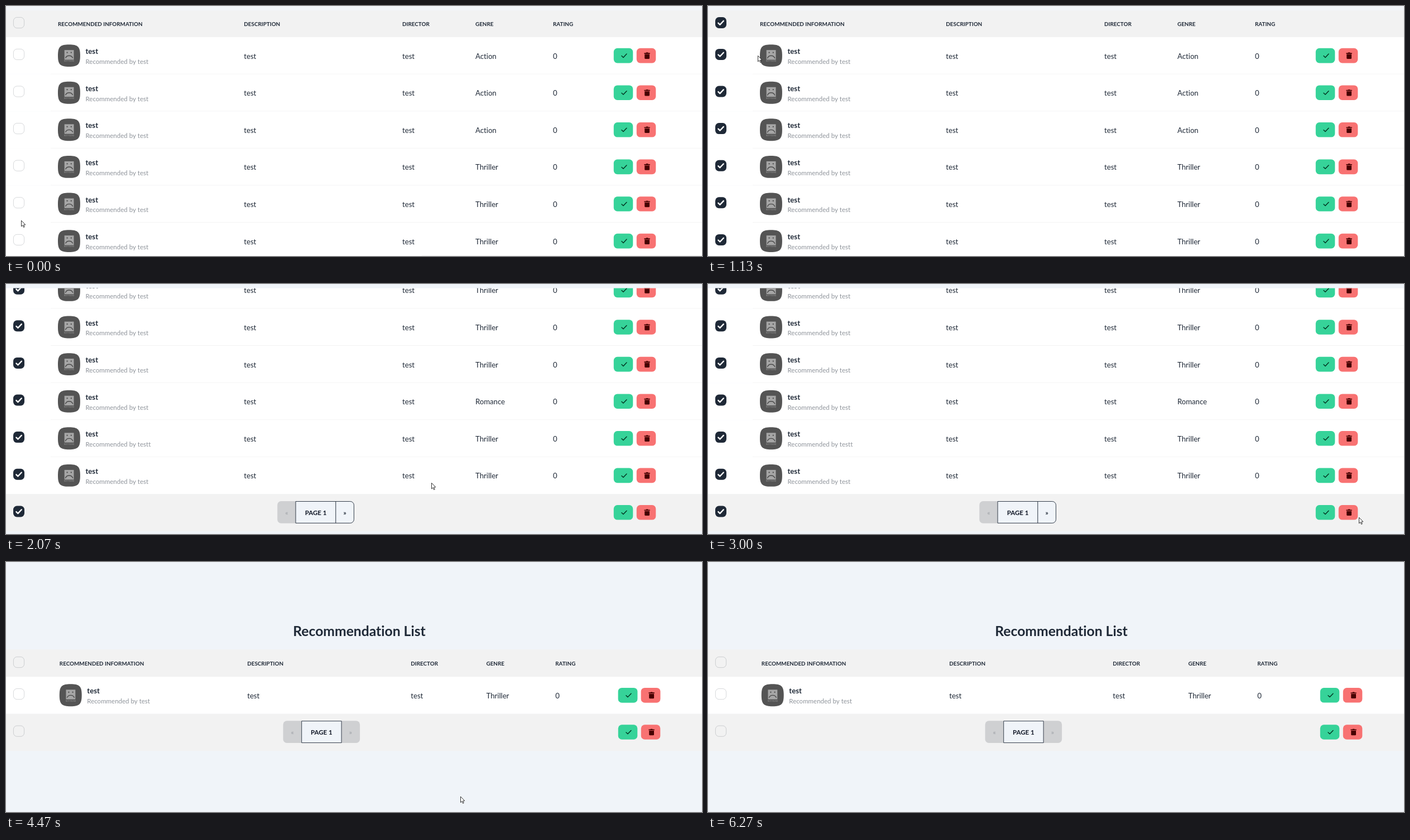
These frames come from a looping animation (1247x449 px, 6.54 s). An HTML page with a canvas:

```html
<!DOCTYPE html>
<html lang="en">
<head>
<meta charset="utf-8">
<title>Recommendation List</title>
<style>
  html, body { margin: 0; width: 100%; height: 100%; overflow: hidden; background: #f0f4f9; }
  canvas { display: block; width: 1247px; height: 449px; }
</style>
</head>
<body>
<canvas id="stage"></canvas>
<script>
const W = 1247, H = 449, LOOP = 6540, FPS = 15;
const INK = '#1f2937', SOFT = '#f2f2f2', PAGE = '#f0f4f9';
const ROW = 66.6, BTN_R = 6.65;

// Type sizes follow one zoom factor
const ZOOM = 0.822;
const SIZE = { head: 12 * ZOOM, small: 14 * ZOOM, body: 16 * ZOOM, title: 30 * ZOOM };

// Moments of the story, in ticks of 1/15 s
const CHECK = 12, SCROLL = 22, BLINK = 52, RELOAD = 65, LEAVE = 86, RETURN = 90, EXIT = 94;
const SCROLL_END = 344.6, SCROLL_TICKS = 5;

const canvas = document.getElementById('stage');
const dpr = window.devicePixelRatio || 1;
canvas.width = W * dpr;
canvas.height = H * dpr;
const ctx = canvas.getContext('2d');

// Column positions of the long table and of the single-row table
const wide = { info: 93, desc: 426.3, director: 710, genre: 841, rating: 980, accept: 1088.8, pager: 486.2 };
const short = { info: 95.8, desc: 432.2, director: 725.3, genre: 860.5, rating: 984.2, accept: 1096.8, pager: 496.5 };

// Pointer glides: from tick, to tick, destination
const START = [27, 385];
const glides = [
  [1, 10, 17, 34], [14, 17, 89, 89], [17, 21, 703, 261], [24, 32, 763, 359],
  [33, 40, 1177, 432], [41, 45, 1166, 419], [58, 65, 1156, 447], [65, 75, 206, 375],
  [75, 79, 334, 407], [79, 85, 665, 418], [88, 90, 148, 436], [90, 93, 80, 440]
];

const progress = (now, from, to) => Math.min(1, Math.max(0, (now - from) / (to - from)));
const easeOut = (p, power = 2) => 1 - (1 - p) ** power;
const scrollAt = now => SCROLL_END * easeOut(progress(now, SCROLL, SCROLL + SCROLL_TICKS), 2.9);
const genreOf = i => i < 3 ? 'Action' : i === 7 ? 'Romance' : 'Thriller';

// Freshly mounted buttons spring to full size
function popAt(now) {
  const n = now - RELOAD;
  return n < 0 ? 1 : 1 - 0.03 * Math.cos(n * Math.PI / 2.5) * Math.exp(-n / 2);
}

function pointerAt(now) {
  let [x, y] = START;
  for (const [from, to, nextX, nextY] of glides) {
    const p = easeOut(progress(now, from, to));
    x += (nextX - x) * p;
    y += (nextY - y) * p;
  }
  return [Math.round(x), Math.round(y)];
}

function rect(x, y, w, h, color) {
  ctx.fillStyle = color;
  ctx.fillRect(x, y, w, h);
}

function round(x, y, w, h, r, fill, stroke) {
  ctx.beginPath();
  ctx.roundRect(x, y, w, h, r);
  if (fill) { ctx.fillStyle = fill; ctx.fill(); }
  if (stroke) { ctx.strokeStyle = stroke; ctx.lineWidth = 0.9; ctx.stroke(); }
}

function line(points, color, width) {
  ctx.beginPath();
  points.forEach(([x, y]) => ctx.lineTo(x, y));
  ctx.strokeStyle = color;
  ctx.lineWidth = width;
  ctx.lineCap = ctx.lineJoin = 'round';
  ctx.stroke();
}

// Text placed by the vertical middle of its line box
function text(str, x, mid, size, color = INK, weight = 400, align = 'left') {
  ctx.font = `${weight} ${size}px Lato, sans-serif`;
  ctx.letterSpacing = '0.005px'; // any spacing turns ligatures off
  ctx.textAlign = align;
  ctx.fillStyle = color;
  ctx.fillText(str, x, mid + size * 0.387);
}

function checkbox(mid, checked) {
  const y = mid - 10;
  if (!checked) {
    round(13.4, y + 0.4, 19.2, 19.2, 6.3, null, 'rgba(31,41,55,0.2)');
    return;
  }
  round(13, y, 20, 20, BTN_R, INK);
  line([[18.4, mid + 0.6], [21.4, mid + 3.6], [27.8, mid - 3.2]], '#fff', 2.4);
}

function avatar(x, mid) {
  ctx.save();
  ctx.translate(x, mid - 19.95);
  ctx.save();
  ctx.scale(0.1995, 0.1995);
  ctx.fillStyle = '#545454';
  ctx.fill(new Path2D('M100 0C20 0 0 20 0 100s20 100 100 100 100-20 100-100S180 0 100 0Z'));
  ctx.restore();
  rect(11.7, 10, 16.8, 17.3, '#a6a6a6');
  for (const eye of [15.6, 22.8]) rect(eye, 13.4, 2, 2, '#4a4a4a');
  ctx.beginPath();
  ctx.moveTo(13.6, 24.4);
  ctx.bezierCurveTo(15.5, 18.6, 24.7, 18.6, 26.6, 24.4);
  ctx.strokeStyle = '#4a4a4a';
  ctx.lineWidth = 1.4;
  ctx.stroke();
  text('NOT FOUND', 20.1, 30, 3, '#8c8c8c', 700, 'center');
  ctx.restore();
}

function button(x, mid, color, scale, icon) {
  ctx.save();
  ctx.translate(x + 17.2, mid);
  ctx.scale(scale, scale);
  round(-17.2, -13.3, 34.5, 26.6, BTN_R, color);
  ctx.translate(1.6, 0);
  icon();
  ctx.restore();
}

function tickIcon() {
  line([[-4.6, 0.5], [-1.6, 3.3], [4.4, -3]], '#00331f', 1.4);
}

function trashIcon() {
  const c = '#470000';
  round(-5.2, -4.9, 10.4, 1.7, 0.5, c);
  round(-1.9, -5.8, 3.8, 1.5, 0.6, c);
  round(-4.4, -2.5, 8.8, 8.3, [0, 0, 1.5, 1.5], c);
}

function actions(col, mid, scale = 1) {
  button(col.accept, mid, '#36d399', scale, tickIcon);
  button(col.accept + 41, mid, '#f87272', scale, trashIcon);
}

function header(col, top, height, checked) {
  const mid = top + height / 2;
  rect(0, top, W, height, SOFT);
  checkbox(mid - 1.8, checked);
  const labels = { info: 'RECOMMENDED INFORMATION', desc: 'DESCRIPTION', director: 'DIRECTOR', genre: 'GENRE', rating: 'RATING' };
  for (const key in labels) text(labels[key], col[key], mid, SIZE.head, INK, 700);
}

function row(col, top, { genre, by = 'test', checked, loading, scale, border }) {
  const mid = top + ROW / 2;
  rect(0, top, W, ROW, '#fff');
  checkbox(mid - 2.4, checked);
  if (loading) {
    ctx.save();
    ctx.beginPath();
    ctx.rect(col.info, top, 36.8, ROW);
    ctx.clip();
    text('Movie', col.info + 3.4, mid - 8.3, SIZE.body);
    ctx.restore();
  } else {
    avatar(col.info, mid - 0.2);
  }
  text('test', col.info + 49.5, mid - 8.2, SIZE.body, INK, 700);
  text('Recommended by ' + by, col.info + 49.5, mid + 10.2, SIZE.small, '#8f949b');
  const cells = { desc: 'test', director: 'test', genre, rating: '0' };
  for (const key in cells) text(cells[key], col[key], mid + 0.2, SIZE.body);
  actions(col, mid - 0.2, scale);
  if (border) rect(80, top + ROW - 0.9, W - 80, 0.9, SOFT);
}

function footer(col, top, checked, hasNext) {
  const mid = top + ROW / 2, y = mid - 20.6, x = col.pager;
  const off = '#cfd0d2', faint = '#a6a9ae';
  rect(0, top, W, ROW, SOFT);
  checkbox(mid - 2.2, checked);
  round(x, y, 33, 39.6, [BTN_R, 0, 0, BTN_R], off);
  text('«', x + 16.6, mid, SIZE.small, faint, 700, 'center');
  if (hasNext) round(x + 104.2, y + 0.4, 33, 38.9, [0, BTN_R, BTN_R, 0], PAGE, INK);
  else round(x + 104.2, y, 33.4, 39.6, [0, BTN_R, BTN_R, 0], off);
  text('»', x + 120.8, mid, SIZE.small, hasNext ? INK : faint, 700, 'center');
  round(x + 33.2, y + 0.4, 71.4, 38.9, 0, PAGE, INK);
  text('PAGE 1', x + 68.8, mid - 0.3, SIZE.small, '#111827', 700, 'center');
  actions(col, mid - 0.4);
}

function longTable(now) {
  const scroll = scrollAt(now);
  const checked = now >= CHECK;
  const count = now >= RELOAD ? 11 : 10;
  const topOf = i => 56 + i * ROW - scroll;
  ctx.save();
  ctx.beginPath();
  ctx.rect(0, 7.4, W, H);
  ctx.clip();
  header(wide, 7.6 - scroll, 48.4, checked);
  for (let i = 0; i < count; i++) {
    const fresh = i === 10;
    row(wide, topOf(i), {
      genre: genreOf(i),
      by: i === 8 ? 'testt' : 'test',
      checked: checked && !fresh,
      loading: fresh,
      scale: fresh ? popAt(now) : 1,
      border: i < count - 1
    });
  }
  footer(wide, topOf(count), checked, true);
  ctx.restore();
  if (!checked) rect(745, 447.5, W - 745, 1.5, '#f6f6f6');
}

function shortTable(now) {
  text('Recommendation List', 633, 123.2, SIZE.title, INK, 700, 'center');
  header(short, 157.2, 49.2, false);
  row(short, 206.2, { genre: 'Thriller', checked: false, scale: popAt(now) });
  footer(short, 272.6, false, false);
}

function pointer(now) {
  const away = now === BLINK || (now >= LEAVE && now < RETURN) || now >= EXIT;
  if (away) return;
  const [x, y] = pointerAt(now);
  ctx.save();
  ctx.translate(x + 0.5, y + 0.3);
  ctx.fillStyle = '#fff';
  ctx.strokeStyle = '#111';
  ctx.lineWidth = 0.85;
  const arrow = new Path2D('M0 0V10.6L2.4 8.4 4.1 12.2 5.7 11.5 4.1 7.8 7.3 7.6Z');
  ctx.fill(arrow);
  ctx.stroke(arrow);
  ctx.restore();
}

function frame() {
  const now = Math.floor((performance.now() % LOOP + 5) * FPS / 1000);
  ctx.setTransform(dpr, 0, 0, dpr, 0, 0);
  rect(0, 0, W, H, PAGE);
  if (now <= RELOAD) longTable(now);
  else shortTable(now);
  pointer(now);
  requestAnimationFrame(frame);
}
frame();
</script>
</body>
</html>
```
